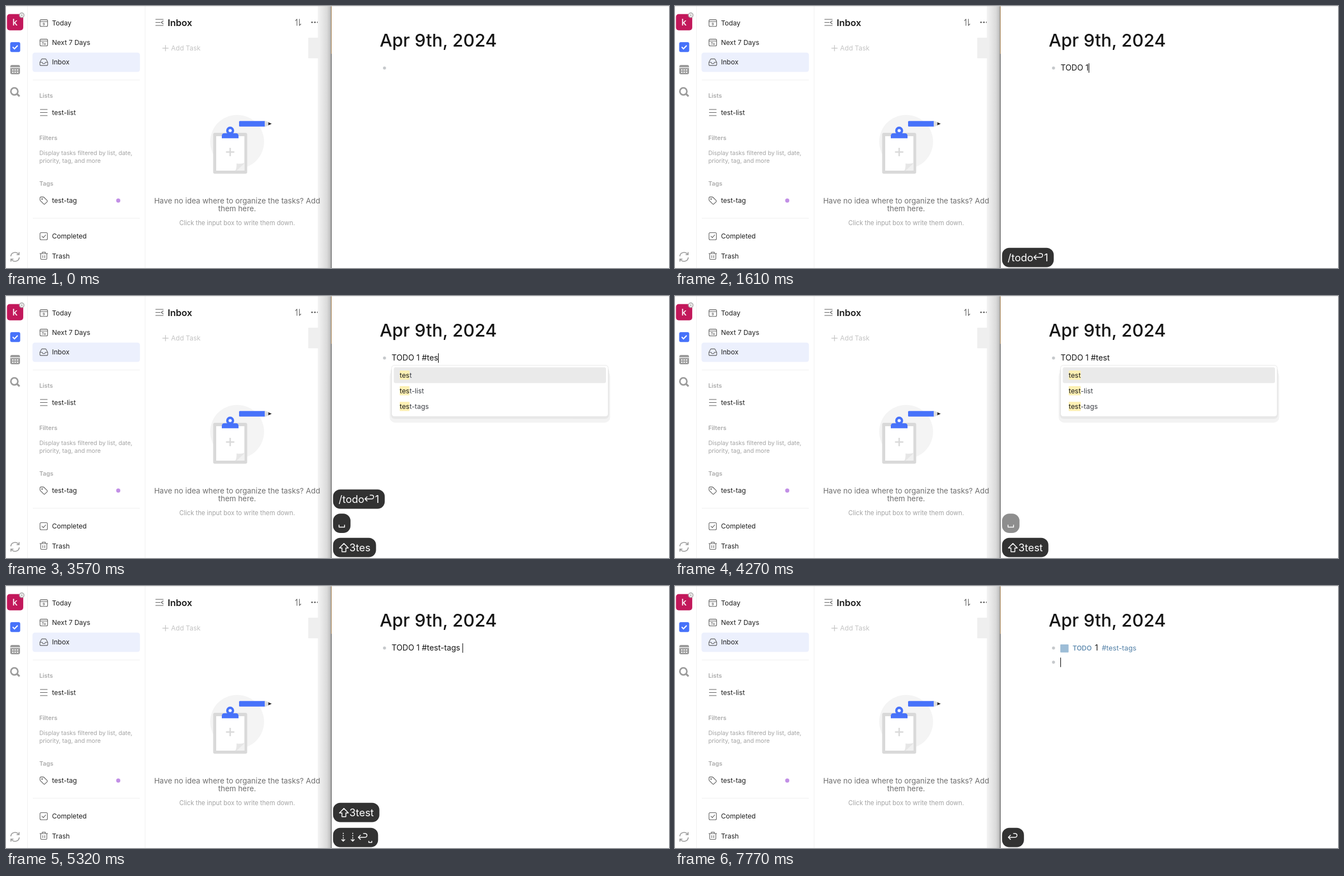
Recreate the animation shown at these times as an HTML page. Size 1189 by 471 pixels, loop 8000 ms.

```html
<!DOCTYPE html>
<html lang="en">
<head>
<meta charset="utf-8">
<title>Task capture</title>
<style>
html, body { margin: 0; width: 100%; height: 100%; overflow: hidden; background: #fff; }
svg { display: block; width: 100vw; height: 100vh; }
text { font-family: Inter, sans-serif; white-space: pre; }
.nav { font-size: 12.05px; fill: #1f1f1f; }
.head { font-size: 10.8px; font-weight: 600; fill: #ababab; }
.hint { font-size: 10.55px; fill: #a3a3a3; }
.ico { fill: none; stroke: #5e5e5e; stroke-width: 1.1; stroke-linecap: round; stroke-linejoin: round; }
.mini { font-size: 6.2px; font-weight: 600; fill: #5e5e5e; text-anchor: middle; }
.mid { text-anchor: middle; }
.body { font-size: 14.15px; fill: #161616; }
.item { font-size: 12.35px; fill: #3d4046; }
.prompt { font-size: 12.35px; fill: #686d78; }
.cat { font-size: 10.25px; fill: #c4c4c4; }
.todo { font-size: 11.9px; font-weight: 600; fill: #6690b3; }
.tag { font-size: 12.75px; fill: #5582a8; }
.key { font-size: 18.4px; fill: #fff; }
.sym { fill: none; stroke: #fff; stroke-width: 1.5; stroke-linejoin: round; }
</style>
</head>
<body>
<svg viewBox="0 0 1189 471" preserveAspectRatio="none">
  <defs>
    <linearGradient id="edge">
      <stop offset="0" stop-color="#f4f4f4"/>
      <stop offset=".3" stop-color="#e9e9e9"/>
      <stop offset=".7" stop-color="#dadada"/>
      <stop offset=".9" stop-color="#c4c4c4"/>
      <stop offset="1" stop-color="#a6a6a6"/>
    </linearGradient>
  </defs>
  <rect width="1189" height="471" fill="#fff"/>

  <!-- rail -->
  <path d="M38.5 0V471M249.5 0V471" stroke="#f0f0f0"/>
  <rect x="1.7" y="14.6" width="29.2" height="29.2" rx="5" fill="#c2185b"/>
  <text x="16" y="35" class="mid" font-size="16.5" font-weight="500" fill="#fff">k</text>
  <circle cx="28.3" cy="16.5" r="4" fill="#fff" stroke="#b3b3b3" stroke-width="1.8"/>
  <circle cx="28.3" cy="16.5" r="1.5" fill="#b3b3b3"/>
  <rect x="7.5" y="65" width="18" height="17.7" rx="3" fill="#4772fa"/>
  <path d="M12 73.8l3.2 3.2 5.8-6" fill="none" stroke="#fff" stroke-width="2"/>
  <rect x="7.7" y="106" width="17.4" height="16.7" rx="3" fill="#9b9b9b"/>
  <path d="M7.7 110.8H25" stroke="#fff" stroke-width="1.3"/>
  <path d="M11 115H22M11 119H22" stroke="#fff" stroke-width="2.2" stroke-dasharray="2.4 1.9"/>
  <circle cx="15" cy="153.5" r="6.3" fill="none" stroke="#9b9b9b" stroke-width="2.8"/>
  <path d="M19.7 158l4.6 4.4" stroke="#9b9b9b" stroke-width="3.2"/>
  <g fill="none" stroke="#9b9b9b" stroke-width="1.7">
    <path d="M8.6 450a7.6 7.6 0 0 1 14-3.4M23.8 452a7.6 7.6 0 0 1-14 3.4"/>
    <path d="M23.5 442.5V447H19M8.8 459.5V455H13.4"/>
  </g>

  <!-- sidebar -->
  <rect x="47.5" y="83.7" width="192.7" height="34.8" rx="4.5" fill="#ecf0fd"/>
  <path d="M48 133H240M48 381.5H240" stroke="#f0f0f0"/>
  <g class="ico">
    <rect x="61" y="24.6" width="13.6" height="12.2" rx="2"/><path d="M61 28H74.6"/>
    <rect x="61" y="59.6" width="13.6" height="12.2" rx="2"/><path d="M61 63H74.6"/>
    <path d="M60.8 101.3L63.6 96q.5-.9 1.6-.9h5.2q1.1 0 1.6.9l2.8 5.3v3.6q0 2-2 2H62.8q-2 0-2-2zM60.8 101.3H65q.3 2.4 2.8 2.4t2.8-2.4h4.2"/>
    <path d="M61.5 186H74M61.5 191.5H74M61.5 197H74"/>
    <path d="M61 345q0-1.6 1.6-1.6h4.2q.8 0 1.4.6l5.6 5.6q1.1 1.1 0 2.2l-4 4q-1.1 1.1-2.2 0l-6-6q-.6-.6-.6-1.4z"/>
    <circle cx="64.7" cy="347" r=".8"/>
    <rect x="61" y="407.5" width="13.3" height="12.7" rx="2"/><path d="M64.5 413.8l2.5 2.5 4.2-4.6"/>
    <path d="M60.8 445H74.6M65 445v-2.5h5.5V445M62.2 445v9q0 1.5 1.5 1.5h8q1.5 0 1.5-1.5v-9M66 448.5v4M69.5 448.5v4"/>
  </g>
  <text x="67.8" y="35.2" class="mini">9</text>
  <text x="67.8" y="70.2" class="mini">Tu</text>
  <g class="nav">
    <text x="82.5" y="35.3">Today</text>
    <text x="82.5" y="70.3">Next 7 Days</text>
    <text x="82.5" y="105.3">Inbox</text>
    <text x="82.5" y="195.8">test-list</text>
    <text x="82.5" y="354.3">test-tag</text>
    <text x="82.5" y="418.3">Completed</text>
    <text x="82.5" y="453.5">Trash</text>
  </g>
  <circle cx="201.3" cy="349.8" r="3.7" fill="#c28fe6"/>
  <g class="head">
    <text x="59.7" y="165">Lists</text>
    <text x="59.7" y="240.8">Filters</text>
    <text x="59.7" y="323.2">Tags</text>
  </g>
  <g class="hint">
    <text x="59.7" y="267.8">Display tasks filtered by list, date,</text>
    <text x="59.7" y="282">priority, tag, and more</text>
  </g>

  <!-- task pane -->
  <path d="M268.5 24H282M268.5 29.5H276.5M268.5 35H282M282 26.8l-3.6 2.7 3.6 2.7" class="ico"/>
  <text x="290" y="35.6" font-size="16.4" font-weight="600" fill="#1a1a1a">Inbox</text>
  <path d="M521.8 35V23.6l-2.6 2.7M526.2 23.6V35l2.6-2.7" class="ico"/>
  <g fill="#555"><circle cx="548.8" cy="29.3" r="1.4"/><circle cx="554" cy="29.3" r="1.4"/><circle cx="559.2" cy="29.3" r="1.4"/></g>
  <path d="M280.5 75.8H291.5M286 70.3V81.3" stroke="#c2c2c2" stroke-width="1.2"/>
  <text x="296" y="80" font-size="12" fill="#c4c4c4">Add Task</text>
  <rect x="559" width="24" height="471" fill="url(#edge)"/>
  <rect x="542" y="57" width="19.5" height="37" fill="#efefef"/>
  <path d="M583.5 0V471" stroke="#5c5c5c"/>
  <path d="M583.5 0V86" stroke="#b08a58"/>
  <path d="M0 .3H1189" stroke="#d6d6d6" stroke-width=".7"/>

  <circle cx="414.5" cy="244" r="48.3" fill="#f4f4f4"/>
  <rect x="371.5" y="228" width="61" height="73.5" rx="3" fill="#d9d9d9"/>
  <path d="M377 234H427.5V296H377z" fill="#fff"/>
  <path d="M427.5 282V296H411q3-4 2.5-13 7 1.5 14-1z" fill="#e6e6e6"/>
  <path d="M427.5 283l-14 13h14z" fill="#f1f1f1"/>
  <path d="M394.5 262.5H409.5M402 255V270" stroke="#d9d9d9" stroke-width="2.6"/>
  <path d="M387 237.7v-4q0-5 5-5h20q5 0 5 5v4z" fill="#4772fa"/>
  <circle cx="402" cy="224" r="5" fill="#fff" stroke="#4772fa" stroke-width="4.4"/>
  <path d="M419.5 206.7H464.5V216.7H419.5q-1.5 0-1.5-1.5v-7q0-1.5 1.5-1.5z" fill="#4772fa"/>
  <path d="M464 206.7h2l6 2.8v4.4l-6 2.8h-2z" fill="#dedede"/>
  <path d="M470.5 209l6 2.8-6 2.8z" fill="#222"/>

  <g class="mid" fill="#6f6f6f" font-size="13.4">
    <text x="414.5" y="355">Have no idea where to organize the tasks? Add</text>
    <text x="414.5" y="369">them here.</text>
  </g>
  <text x="414.5" y="394" class="mid" font-size="11.25" fill="#a3a3a3">Click the input box to write them down.</text>

  <!-- journal -->
  <text x="670.2" y="73.2" font-size="31.6" font-weight="500" fill="#161616">Apr 9th, 2024</text>
  <circle cx="678.8" cy="111.5" r="2.7" fill="#c6c9cc"/>
  <g id="live"></g>
</svg>
<script>
const LOOP = 8000, STEP = 70, ROW = 28.1;
const BODY = 14.15, ITEM = 12.35, KEY = 18.4;
const live = document.getElementById('live');
const pen = document.createElement('canvas').getContext('2d');

const typed = [
  [0, ''], [140, '/'], [350, '/t'], [490, '/to'], [700, '/tod'], [770, '/todo'],
  [1260, 'TODO '], [1610, 'TODO 1'], [2170, 'TODO 1 '], [2870, 'TODO 1 #'],
  [3360, 'TODO 1 #t'], [3500, 'TODO 1 #te'], [3570, 'TODO 1 #tes'], [3710, 'TODO 1 #test'],
  [4830, 'TODO 1 #test-tags'], [5320, 'TODO 1 #test-tags ']
];
const DONE = 6720;
const blinks = [140, 2660, 2870, 4200, 4690, 5880, 6370, 7210, 7770];

// Key caps: the keys each one collects and when they are pressed.
const caps = [
  { keys: '/todo↵1', at: [140, 350, 490, 700, 770, 1190, 1610], pitch: 43.5 },
  { keys: '␣', at: [2170], pitch: 43.5 },
  { keys: '⇧3test', at: [2870, 2940, 3360, 3500, 3570, 3710], pitch: 43.5 },
  { keys: '⇣⇣↵˽', at: [4410, 4550, 4830, 5320], pitch: 45 },
  { keys: '↵', at: [6720], pitch: 43.5 }
];
const symbols = {
  '↵': { w: 19.3, d: 'M1.3 17H13.5a3.4 3.4 0 0 0 0-6.8H10M5.5 12.8L1.3 17l4.2 4.2' },
  '⇧': { w: 19.3, d: 'M9.5 10.2L1.5 18.3H6V25h7v-6.7h4.5z' },
  '␣': { w: 11.3, d: 'M.8 20v4.3H10.7V20' },
  '˽': { w: 7.5, d: 'M.8 23.5v2.8H6.2v-2.8' },
  '⇣': { w: 17, d: 'M8.3 9v2M8.3 13v2M8.3 17v2M8.3 20v4M5.1 20.8L8.3 24l3.2-3.2' }
};

const commands = ['TODO', 'Today', '#TIME & DATE', 'Tomorrow', 'Calculator', 'Zotero', 'Query function'];
const allCommands = ['Page reference', 'Page embed', 'Block reference', 'Block embed', 'Link', 'Image link',
  '#TIME & DATE', 'Today', 'Tomorrow', 'Yesterday', 'Current time', 'Date picker'];
const tags = ['test', 'test-list', 'test-tags'];

const esc = s => s.replace(/&/g, '&amp;');
const text = (x, y, cls, s) => `<text x="${x}" y="${y}" class="${cls}">${esc(s)}</text>`;
const box = (x, y, w, h, r, fill) => `<rect x="${x}" y="${y}" width="${w}" height="${h}" rx="${r}" fill="${fill}"/>`;
const caret = (x, y) => box(x, y, 1.1, 17, 0, '#111');
const lineAt = t => typed.filter(e => e[0] <= t).pop()[1];

function width(s, size) {
  pen.font = `${size}px Inter, sans-serif`;
  return pen.measureText(s).width;
}

function panel(w, h) {
  return box(688, 134, w + 7, h + 1.5, 10, '#f3f3f3') +
    box(690, 128, w + 3, h + .5, 7, '#e8e8e8') +
    `<rect x="691.5" y="124.5" width="${w}" height="${h}" rx="5" fill="#fff" stroke="#e4e4e4" stroke-width=".8"/>`;
}

function list(items, w, sel, left, mark = '') {
  let out = panel(w, items.length * ROW + 8);
  items.forEach((s, i) => {
    const y = 128.2 + i * ROW;
    if (i === sel) out += box(695.5, y, w - 8, ROW + .3, 3, '#eaeaea');
    if (s[0] === '#') {
      out += text(699.5, y + 17.7, 'cat', s.slice(1));
      return;
    }
    if (mark) out += box(left, y + 5.8, width(mark, ITEM), 16.5, 1, '#fdf0b3');
    out += `<text x="${left}" y="${y + 18.5}" class="item"><tspan fill="#1c1c1c">${mark}</tspan>${s.slice(mark.length)}</text>`;
  });
  return out;
}

function popup(t) {
  if (t >= 210 && t < 490) return list(allCommands, 333.5, 0, 702.7);
  if (t >= 490 && t < 1260) return list(commands, 333.5, 0, 702.7);
  if (t >= 2940 && t < 3360) return panel(388.5, 40) + text(706, 148.6, 'prompt', 'Search for a page');
  if (t >= 3360 && t < 4830) {
    const sel = t < 4410 ? 0 : t < 4550 ? 1 : 2;
    return list(tags, 388.5, sel, 706, lineAt(t).split('#')[1]);
  }
  return '';
}

function editor(t) {
  const lit = blinks.filter(b => b <= t).length % 2;
  if (t < DONE) {
    const s = lineAt(t);
    return text(691.5, 116.4, 'body', s) + (lit ? caret(691.5 + width(s, BODY), 103) : '');
  }
  return box(691, 105, 14.8, 14.5, 1, '#9dbdd7') +
    text(713, 116.3, 'todo', 'TODO') +
    text(753, 116.4, 'body', '1') +
    text(765.5, 116.3, 'tag', '#test-tags') +
    '<circle cx="678.8" cy="137" r="2.7" fill="#c6c9cc"/>' +
    (lit ? caret(691, 128.7) : '');
}

function cap(c, y, t) {
  const last = c.at[c.at.length - 1];
  const alpha = Math.min(1, 1 - (t - last - 2000) / 220);
  if (alpha <= 0) return '';
  let x = 10, out = '';
  for (const k of [...c.keys].slice(0, c.at.filter(a => a <= t).length)) {
    const sym = symbols[k];
    out += sym
      ? `<path class="sym" transform="translate(${x} 0)" d="${sym.d}"/>`
      : text(x, 24.4, 'key', k);
    x += sym ? sym.w : width(k, KEY);
  }
  return `<g transform="translate(586.5 ${y})" opacity="${alpha}">${box(0, 0, x + 10, 34.8, 13, '#323232')}${out}</g>`;
}

function capStack(t) {
  let y = 434.7, out = '';
  for (const c of caps.filter(c => c.at[0] <= t).reverse()) {
    out += cap(c, y, t);
    y -= c.pitch;
  }
  return out;
}

const start = performance.now();
let shown = -1;
function draw(now) {
  const t = Math.floor(Math.max(0, now - start) % LOOP / STEP) * STEP;
  if (t !== shown) {
    shown = t;
    live.innerHTML = popup(t) + editor(t) + capStack(t);
  }
  requestAnimationFrame(draw);
}
requestAnimationFrame(draw);
</script>
</body>
</html>
```
